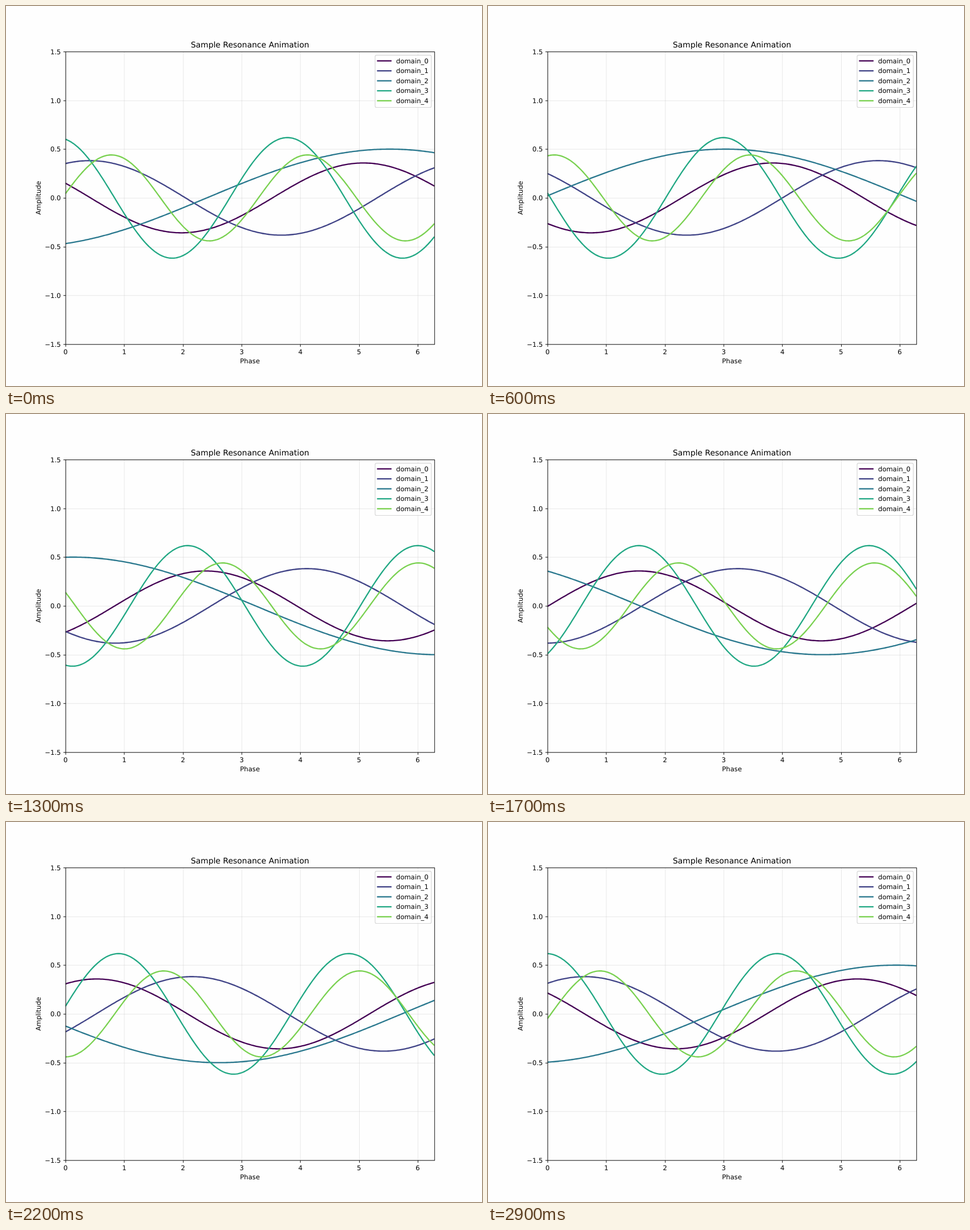
Recreate the animation shown at these times as an HTML page. Size 837 px wide and 669 px high, loop 3000 ms.

```html
<!DOCTYPE html>
<html lang="en">
<head>
<meta charset="utf-8">
<title>Sample Resonance Animation</title>
<style>
  html, body { margin: 0; width: 100%; height: 100%; overflow: hidden; background: #fefefe; }
  svg { display: block; width: 837px; height: 669px; }
  text { font: 13.889px "DejaVu Sans", sans-serif; text-rendering: geometricPrecision; }
  .title { font-size: 16.667px; }
  .mid { text-anchor: middle; }
  .end { text-anchor: end; }
  .grid { stroke: #b0b0b0; stroke-opacity: .3; stroke-width: 1.111; }
  .axis { fill: none; stroke: #000; stroke-width: 1.111; }
  .wave { fill: none; stroke-width: 2.778; stroke-linejoin: round; }
  .key { stroke-width: 2.778; stroke-linecap: square; }
  .box { fill: #fff; fill-opacity: .8; stroke: #ccc; stroke-opacity: .8; stroke-width: 1.389; }
</style>
</head>
<body>
<svg id="chart" viewBox="0 0 1000 800" preserveAspectRatio="none"></svg>
<script>
const STEP = 100, STEPS = 30, TAU = 2 * Math.PI;
const LEFT = 125, RIGHT = 900, TOP = 96, BOTTOM = 712;

// amplitude, frequency, phase, colour
const waves = [
  [0.358, 1.014, 2.709, '#440154'],
  [0.382, 0.963, 1.173, '#414487'],
  [0.5, 0.5045, -1.214, '#2a788e'],
  [0.618, 1.6015, 1.803, '#22a884'],
  [0.4405, 1.882, 0.099, '#7ad151']
];

const chart = document.getElementById('chart');
const px = x => LEFT + x / TAU * (RIGHT - LEFT);
const py = y => TOP + (1.5 - y) / 3 * (BOTTOM - TOP);
const snap = v => Math.floor(v + 0.5) + 0.5;

function add(tag, attrs, parent = chart) {
  const el = document.createElementNS('http://www.w3.org/2000/svg', tag);
  for (const name in attrs) el.setAttribute(name, attrs[name]);
  parent.appendChild(el);
  return el;
}

function label(str, x, y, cls = '', extra = {}) {
  add('text', { x, y, class: cls, ...extra }).textContent = str;
}

const clip = add('clipPath', { id: 'plot' });
add('rect', { x: LEFT, y: TOP, width: RIGHT - LEFT, height: BOTTOM - TOP }, clip);

for (let i = 0; i <= 6; i++) {
  const x = snap(px(i)), value = 1.5 - i / 2, y = snap(py(value));
  add('path', { class: 'grid', d: `M${x} ${TOP}V${BOTTOM}` });
  add('path', { class: 'grid', d: `M${LEFT} ${y}H${RIGHT}` });
  add('path', { class: 'axis', d: `M${x} 712.5v4.86M125.5 ${y}h-4.86` });
  label(i, px(i), 732.6, 'mid');
  label(value.toFixed(1).replace('-', '\u2212'), 115.3, py(value) + 5.3, 'end');
}

const plot = add('g', { 'clip-path': 'url(#plot)' });
const lines = waves.map(w => add('path', { class: 'wave', stroke: w[3] }, plot));

add('rect', { class: 'axis', x: 125.5, y: 96.5, width: 775, height: 616 });
label('Sample Resonance Animation', 512.5, 87.7, 'mid title');
label('Phase', 512.5, 752.4, 'mid');
label('Amplitude', 0, 0, 'mid', { transform: 'translate(72.8 404) rotate(-90)' });

add('rect', { class: 'box', x: 775.5, y: 103.5, width: 118, height: 110, rx: 2.78 });
waves.forEach((w, i) => {
  const y = 115.4 + 20.94 * i;
  add('path', { class: 'key', stroke: w[3], d: `M780.8 ${snap(y - 0.5)}h27.78` });
  label('domain_' + i, 819.7, y + 4.9);
});

function draw(step) {
  const shift = TAU * step / STEPS;
  waves.forEach(([amp, freq, phase], k) => {
    let d = '';
    for (let i = 0; i <= 240; i++) {
      const x = TAU * i / 240;
      d += (i ? 'L' : 'M') + px(x).toFixed(2) + ' ' +
        py(amp * Math.sin(freq * x + phase + shift)).toFixed(2);
    }
    lines[k].setAttribute('d', d);
  });
}

const start = performance.now();
let shown = -1;

function tick() {
  const step = Math.floor((performance.now() - start) / STEP) % STEPS;
  if (step !== shown) draw(shown = step);
  requestAnimationFrame(tick);
}
tick();
</script>
</body>
</html>
```
